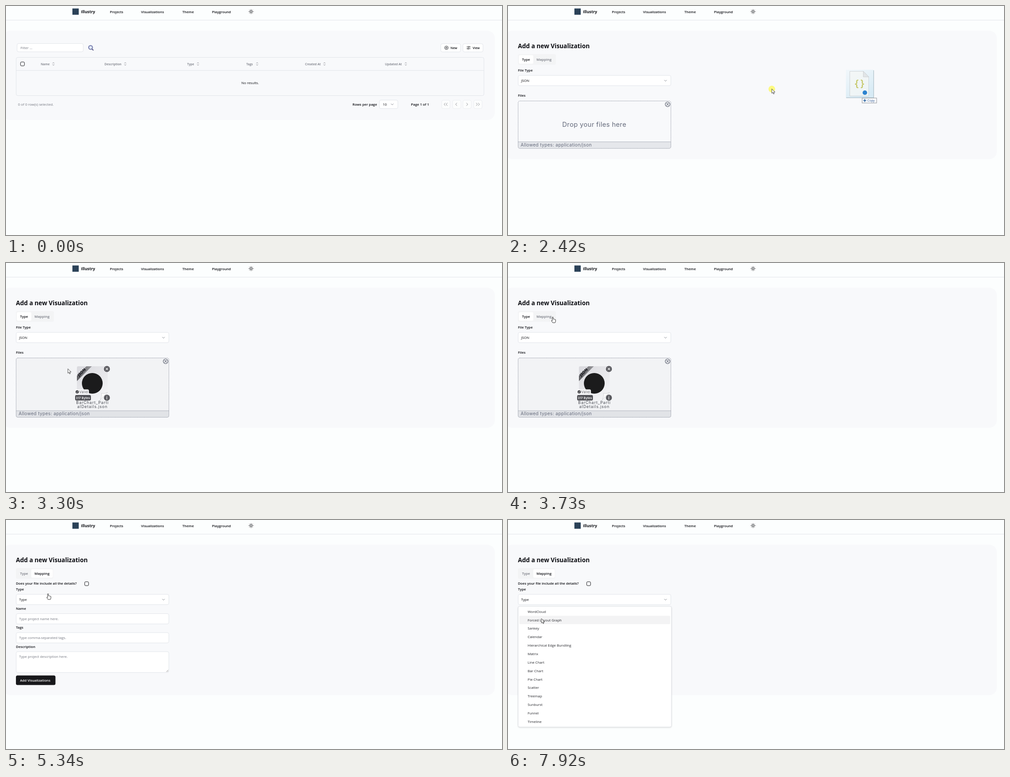
These frames come from a looping animation (1098 px wide and 510 px high, 7.99 s). An HTML page:

```html
<!DOCTYPE html>
<html lang="en">
<head>
<meta charset="utf-8">
<title>Add a visualization</title>
<style>
  html, body { margin: 0; width: 100%; height: 100%; overflow: hidden; background: #fcfefe; }
  svg { display: block; width: 1098px; height: 510px; }
  text { font-family: "Open Sans", "Noto Sans", sans-serif; white-space: pre; }
  .round { font-family: Inter, Lato, sans-serif; }
</style>
</head>
<body>
<svg id="stage" viewBox="0 0 1098 510"></svg>
<script>
const LOOP = 7990;
const INK = '#0c0d12', GRAY = '#747780', LINE = '#e2e5ea', SLATE = '#646a7b';

// Drawing helpers
const text = (x, y, s, { size = 7.75, fill = INK, weight = 400, more = '' } = {}) =>
  `<text x="${x}" y="${y}" font-size="${size}" fill="${fill}" font-weight="${weight}" ${more}>${s}</text>`;
const bold = (x, y, s, size = 7.75, fill = INK) => text(x, y, s, { size, fill, weight: 600 });
const round = (x, y, s, size, spacing, fill = SLATE, more = '') =>
  text(x, y, s, { size, fill, more: `class="round" letter-spacing="${spacing}" ${more}` });
const box = (x, y, w, h, fill = '#fff', stroke = LINE, r = 3.5, more = '') =>
  `<rect x="${x}" y="${y}" width="${w}" height="${h}" rx="${r}" fill="${fill}" stroke="${stroke}" ${more}/>`;
const path = (d, stroke, width = 1, fill = 'none') =>
  `<path d="${d}" fill="${fill}" stroke="${stroke}" stroke-width="${width}" stroke-linecap="round" stroke-linejoin="round"/>`;
const dot = (x, y, r, fill, stroke = 'none', width = 1) =>
  `<circle cx="${x}" cy="${y}" r="${r}" fill="${fill}" stroke="${stroke}" stroke-width="${width}"/>`;
const group = (id, ...parts) => `<g id="${id}">${parts.join('')}</g>`;
const fade = (id, from, to, x2, y2) => `<linearGradient id="${id}" x1="0" y1="0" x2="${x2}" y2="${y2}">` +
  `<stop stop-color="${from}"/><stop offset="1" stop-color="${to}"/></linearGradient>`;
const chevron = (x, y) => path(`M${x - 2.5} ${y - 1.2}l2.5 2.5 2.5-2.5`, '#777b84', 0.9);
const check = (x, y) => box(x, y, 8.6, 8.6, 'none', '#18181b', 2);
const cross = (x, y, r, color, w) =>
  path(`M${x - r} ${y - r}l${2 * r} ${2 * r}m0 ${-2 * r}l${-2 * r} ${2 * r}`, color, w);

function sun(x, y) {
  let d = '';
  for (let i = 0; i < 8; i++) {
    const c = Math.cos(i * Math.PI / 4), s = Math.sin(i * Math.PI / 4);
    d += `M${x + 3.6 * c} ${y + 3.6 * s}L${x + 4.7 * c} ${y + 4.7 * s}`;
  }
  return dot(x, y, 2.1, 'none', INK, 1) + path(d, INK, 1);
}

const fades = fade('sheen', '#e8f4fa70', '#c3e2f1a0', 0.6, 1) +
  fade('sheet', '#d9d9de', '#f3f3f5', 0.7, 1) + fade('ribbon', '#5f5f63', '#98989c', 1, 0);

const header = group('header',
  path('M0 31.5H1098', LINE),
  '<rect x="147" y="5.5" width="14" height="14" fill="#2b4258"/>',
  text(166, 16, 'Illustry', { size: 8.8, weight: 700 }),
  [[230, 'Projects'], [299, 'Visualizations'], [390.5, 'Theme'], [456, 'Playground']]
    .map(([x, s]) => bold(x, 15.5, s, 7.65)).join(''),
  sun(542.5, 12.5));

const columns = [[77, 105, 'Name'], [218, 264, 'Description'], [401, 425, 'Type'],
  [532, 556, 'Tags'], [662, 705, 'Created At'], [839, 885, 'Updated At']];
const pager = [[964.5, 'M972.5 216l-2.7 3 2.7 3m4.4-6l-2.7 3 2.7 3'], [988.5, 'M998 216l-2.7 3 2.7 3'],
  [1011.5, 'M1019.5 216l2.7 3-2.7 3'], [1035.5, 'M1041 216l2.7 3-2.7 3m4.4-6l2.7 3-2.7 3']];

const list = group('list',
  box(24.5, 83.5, 146.5, 18.5),
  text(32, 96.3, 'Filter ...', { fill: GRAY }),
  dot(187.2, 92.3, 4.2, '#e6edf8', '#7f86b4', 2.2), path('M190.6 96l2.4 2.3', '#5c5c86', 2),
  box(962.5, 84, 44, 18.3), box(1011.5, 84, 44.5, 18.3),
  dot(975, 93, 3.9, 'none', INK, 0.8), path('M973 93h4m-2-2v4', INK, 0.8),
  path('M1020 91h3m3.2 0h1.8M1020 95h1.6m3.2 0h3.2', INK, 0.8),
  dot(1024.6, 91, 1.4, 'none', INK, 0.8), dot(1023.2, 95, 1.4, 'none', INK, 0.8),
  bold(984, 95.7, 'New', 6.9), bold(1033, 95.7, 'View', 6.9),
  box(22.5, 114.5, 1035.5, 85, 'none'), path('M22.5 143.5H1058', LINE),
  check(32.2, 124.7),
  columns.map(([x, icon, s]) => bold(x, 131.6, s, 6.8, GRAY) +
    path(`M${icon - 1.8} 127.6l1.8-1.8 1.8 1.8m-3.6 2.8l1.8 1.8 1.8-1.8`, '#71717a', 0.8)).join(''),
  text(540.3, 174.3, 'No results.', { more: 'text-anchor="middle"' }),
  text(26.5, 221.9, '0 of 0 row(s) selected.', { size: 7.85, fill: GRAY }),
  bold(767, 221.9, 'Rows per page'),
  box(826.5, 209.5, 41, 19), text(834, 221.9, '10'), chevron(855, 219),
  bold(896.5, 221.9, 'Page 1 of 1', 7.7),
  pager.map(([x, d]) => box(x, 209.8, 18.5, 18.5, '#fcfdfd', '#eceef1') + path(d, '#85878c', 0.9)).join(''));

const tabs = active => box(22, 107.3, active ? 82.5 : 84, 23.5, '#f3f4f5', 'none') +
  (active ? box(56, 109.5, 47.5, 19, '#fff', 'none', 2.5) : box(24, 109.5, 32, 19, '#fff', 'none', 2.5)) +
  bold(31, 121.9, 'Type', 7.8, active ? GRAY : INK) + bold(63, 121.9, 'Mapping', 7.9, active ? INK : GRAY);

const zone = (bottom, fill, foot, width = 0.8, color = '#7b8190') =>
  `<rect x="22" y="211" width="339" height="${bottom - 211}" rx="4" fill="${fill}"/>` +
  `<path d="M22 ${bottom - 15}h339v11q0 4-4 4h-331q-4 0-4-4z" fill="${foot}"/>` +
  path(`M22.5 ${bottom - 15}H360.5`, '#a3a8b3', 0.8) +
  box(22 + width / 2, 211.1 + width / 2, 339 - width, bottom - 211 - width, 'none', color, 4,
    `stroke-width="${width}" stroke-dasharray="${width > 1 ? '4 2.4' : '2 1.2'}"`) +
  round(28, bottom - 4.6, 'Allowed types: application/json', 10, 0.33) +
  dot(353.3, 219, 5.2, 'none', '#4d5364', 1.1) + cross(353.3, 219, 2.1, '#4d5364', 1.1);
const prompt = round(191, 269, 'Drop your files here', 14.5, 0.33, SLATE, 'text-anchor="middle"');

const fileCard = [
  '<path d="M160 230H221Q225 230 225 234V288L208 305H160Q157 305 157 302V233Q157 230 160 230Z" fill="url(#sheet)"/>',
  '<path d="M225 288L208 305Q213 296 211 290Q218 292 225 288Z" fill="#fafafa" stroke="#b9b9bd" stroke-width=".5"/>',
  '<path d="M157 251L178 230H190L157 263Z" fill="url(#ribbon)"/>',
  text(0, 0, 'JSON', { size: 8.6, weight: 700, more: 'transform="translate(162 253) rotate(-45)"' }),
  dot(191, 268, 23, '#1b1b1c'),
  dot(223.4, 236, 6.7, '#5b5b60'), cross(223.4, 236, 2.4, '#fff', 1.1),
  dot(223.4, 300, 6.7, '#5b5b60'), bold(221.7, 303.7, 'i', 10, '#fff'),
  box(152.5, 281.5, 31, 11, '#f7f7f8', 'none', 3),
  dot(157.6, 287, 3.6, '#3d3d42'), path('M155.9 287l1.2 1.3 2.2-2.5', '#fff', 0.9),
  round(162, 290, 'Valid', 7.8, 0.3, '#66666c'),
  box(153, 294, 35, 12.3, '#515156', 'none', 3),
  round(154.6, 302.5, '317 Bytes', 6.6, 0.1, '#fff', 'style="font-weight:600"'),
  round(191.4, 314, 'BarChart_Parti', 8.6, 0.95, '#44474f', 'text-anchor="middle"'),
  round(191.4, 323.3, 'alDetails.json', 8.6, 0.95, '#44474f', 'text-anchor="middle"')].join('');

const upload = group('upload', tabs(false),
  bold(22, 146, 'File Type'), box(22.5, 154.5, 338, 23), text(29, 169, 'JSON'), chevron(348.7, 166.3),
  bold(22, 202, 'Files'),
  group('zoneIdle', zone(317.5, '#f8f9fb', '#e5e7eb'), prompt),
  group('zoneOver', zone(317.5, '#bbbfc8', '#b1b5bf', 1.6, '#5d6372'), prompt),
  group('zoneFull', zone(344, '#f2f3f5', '#e1e3e7'), fileCard));

const field = (y, h, label, hint) => bold(22, y - 8, label) + box(22.5, y + 0.5, 338, h) +
  text(29, y + 14.6, hint, { fill: GRAY });
const mapping = group('mapping', tabs(true),
  bold(22, 143.9, 'Does your file include all the details?', 7.65), check(174.2, 137.6),
  bold(22, 157.4, 'Type'), box(22.5, 165.5, 338, 23), text(29, 180.3, 'Type'), chevron(348.7, 177.3),
  field(208, 23, 'Name', 'Type project name here.'),
  field(250.3, 23, 'Tags', 'Type comma-separated tags.'),
  field(292.7, 46.5, 'Description', 'Type project description here.'),
  path('M355 338l4-4m-1.6 4l1.6-1.6', '#777', 0.7),
  box(22, 346.3, 87.5, 21.2, '#18181b', 'none'), bold(31, 359.7, 'Add Visualizations', 7.65, '#fafafa'));

const kinds = ['WordCloud', 'Forced Layout Graph', 'Sankey', 'Calendar', 'Hierarchical Edge Bundling',
  'Matrix', 'Line Chart', 'Bar Chart', 'Pie Chart', 'Scatter', 'Treemap', 'Sunburst', 'Funnel', 'Timeline'];
const ROW = 18.85;
const menu = group('menu',
  box(22.5, 192.2, 339.3, 268.8, '#fff', '#dfe2e6', 3.5, 'style="filter:drop-shadow(0 1.5px 1.5px #0002)"'),
  '<rect id="pick" x="25" y="194.3" width="334" height="18.8" rx="2" fill="#f3f3f4"/>',
  kinds.map((s, i) => text(43.5, 206.7 + ROW * i, s, { fill: '#26272c' })).join(''));

// Drag image, centred on its own origin
const tag = (id, w, label, icon) => group(id,
  box(5.5, 32, w, 11, '#fff', '#8b8f96', 0), icon,
  text(17, 40.4, label, { size: 7, fill: '#27508f' }));
const ghost = group('ghost',
  '<rect x="-30.5" y="-31" width="61" height="62" fill="url(#sheen)"/>',
  path('M-29.5 31.3H31V-29.5', '#8fa6b3b0', 1.2),
  path('M-21.5-27.5H8L20 -15V27.5H-21.5Z', '#c3c8cb', 0.7, '#f5f7f6c0'),
  path('M8-27.5V-15H20Z', '#c3c8cb', 0.7, '#e1e5e7'),
  text(-0.7, 7, '{ }', { size: 22, fill: '#c5c766', weight: 600, more: 'text-anchor="middle" letter-spacing="-.6"' }),
  dot(11.5, 20, 5, '#2d83cf'),
  tag('copy', 32, 'Copy', path('M8.5 37.5h5.5m-2.75-2.75v5.5', '#1d5a9c', 1.6)),
  tag('link', 29, 'Link', path('M12.5 40.3Q8 41 8.8 38Q9.3 35.5 12.5 35.5m-1.7-1.5l1.9 1.5-1.7 1.7', '#27508f', 0.9)));

const pointer = group('pointer',
  '<circle id="glow" r="7.4" fill="#fffb3d" fill-opacity=".65"/>',
  group('arrow', path('M0 0V9.4L2.2 7.4L3.8 11L5.4 10.3L3.9 6.8H6.8Z', '#222', 0.8, '#fff')),
  group('hand', path('M-1 6V0.8Q0-.6 1 .8V5Q2 4.2 2.8 5.2Q4 4.5 4.6 5.7Q6.4 5.2 6.4 7V10L5.2 13H0L-2.6 9Q-3.2 7.2-1 8Z', '#222', 0.9, '#fff')));

document.getElementById('stage').innerHTML = `<defs>${fades}</defs>` + header +
  '<rect id="panel" x="-7" y="55" width="1089.3" rx="17" fill="#f8f9fb"/>' + list +
  group('form', text(22, 94, 'Add a new Visualization', { size: 13.4, weight: 700 }), upload, mapping) +
  menu + ghost + pointer;

// Pointer moves: start, end, steps, waypoints
const drag = [2280, 2890, 10, [[890, 197], [778, 198], [584, 185], [480, 176], [387, 171],
  [300, 184], [230, 205], [180, 224], [148, 238], [138, 241]]];
const moves = [
  [120, 870, 12, [[1058, 492], [1035, 420], [990, 300], [945, 180], [930, 110], [955, 70], [980, 84], [986, 87]]],
  [940, 940, 1, [[988, 87]]],
  [1350, 1350, 1, [[1013, 101]]],
  drag,
  [3300, 3780, 8, [[137, 236], [130, 215], [122, 185], [114, 160], [108, 140], [102, 126], [99, 120], [99, 120]]],
  [3920, 3920, 1, [[98, 120]]],
  [4180, 4310, 2, [[97.5, 120], [97, 120]]],
  [4920, 5690, 12, [[97, 124], [97, 134], [96, 145], [95, 153], [94, 158], [94, 162], [93, 164],
    [75, 172], [50, 180], [25, 184], [17, 182], [40, 186]]],
  [5760, 6050, 5, [[48, 196], [50, 198], [55, 190], [60, 181], [61, 178]]],
  [7450, 7590, 3, [[62, 186], [64, 197], [65, 206]]],
  [7850, 7920, 2, [[70, 214], [74, 220]]]];
const clicks = [[1080, 1210], [2280, 3300], [4580, 4720], [6710, 6850]];
const hands = [[870, 1210], [3640, 5410]];

const stepAt = ([from, to, n], t) =>
  n < 2 ? 0 : Math.max(0, Math.min(n - 1, Math.floor((t - from) * (n - 1) / (to - from) + 0.01)));
function place(move, step) {
  const pts = move[3];
  const u = move[2] < 2 ? 0 : step / (move[2] - 1) * (pts.length - 1);
  const i = Math.min(Math.floor(u), pts.length - 1), a = pts[i], b = pts[i + 1] || a;
  return a.map((v, k) => v + (b[k] - v) * (u - i));
}
const within = (spans, t) => spans.some(([a, b]) => t >= a && t < b);
const el = id => document.getElementById(id);
const show = (id, on) => { el(id).style.display = on ? '' : 'none'; };
const moveTo = (id, [x, y]) => el(id).setAttribute('transform', `translate(${x} ${y})`);

function draw(t) {
  const open = t >= 1140, full = t >= 3300, mapped = t >= 4650;
  const dragging = t >= drag[0] && t < 3300, over = dragging && t >= 2740;
  show('list', !open);
  show('form', open);
  show('upload', !mapped);
  show('mapping', mapped);
  show('zoneIdle', !full && !over);
  show('zoneOver', over);
  show('zoneFull', full);
  el('panel').setAttribute('height', (!open ? 254 : mapped ? 390 : full ? 367 : 341) - 55);

  show('menu', t >= 6710);
  const grown = t < 6780 ? 0 : t < 6850 ? 1 : 2;
  el('menu').setAttribute('opacity', [0.82, 0.95, 1][grown]);
  moveTo('menu', [0, grown - 2]);
  moveTo('pick', [0, t >= 7850 ? ROW : 0]);

  show('ghost', dragging);
  if (dragging) {
    const step = stepAt(drag, t);
    const [x, y] = step === 0 ? [1000, 190] : drag[3][step === 9 ? 9 : step - 1];
    moveTo('ghost', [x + 0.5, y - 25]);
    show('copy', !over);
    show('link', over);
  }

  const move = moves.filter(m => t >= m[0]).pop();
  show('pointer', move && !(t >= 1400 && t < drag[0]));
  if (!move) return;
  moveTo('pointer', place(move, stepAt(move, t)));
  const hand = within(hands, t);
  show('hand', hand);
  show('arrow', !hand);
  show('glow', within(clicks, t));
}

const start = performance.now();
function tick() {
  draw((performance.now() - start) % LOOP);
  requestAnimationFrame(tick);
}
tick();
</script>
</body>
</html>
```
